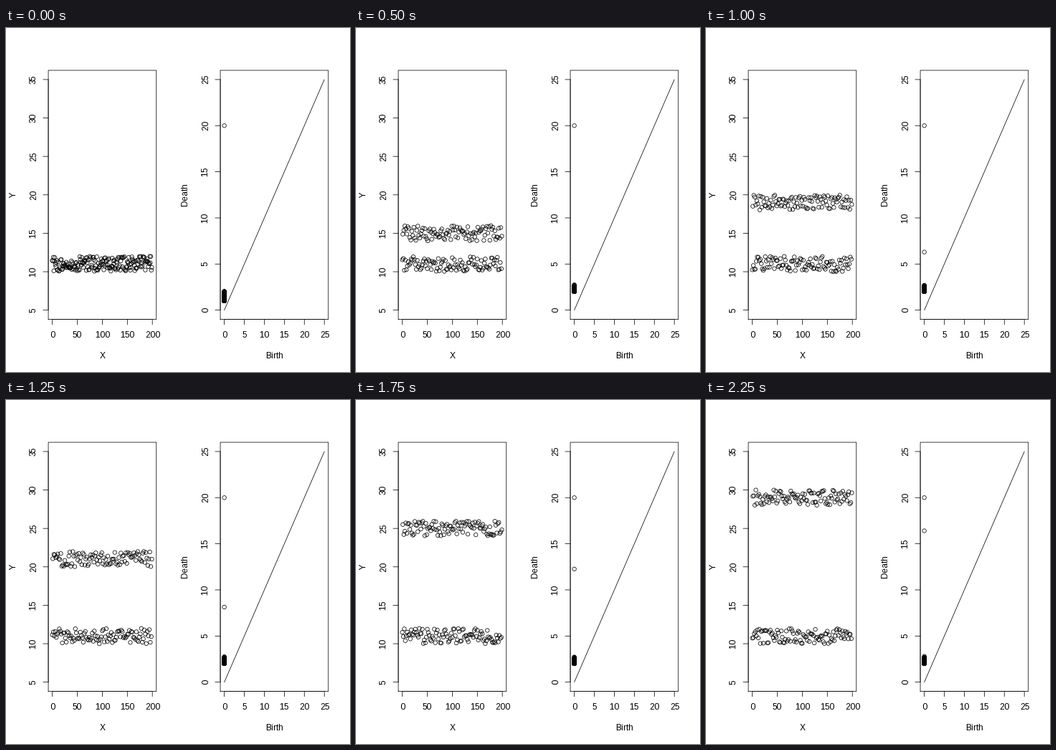
A matplotlib script that plays this animation: 480x480 px, repeating every 2500 ms.

```python
import numpy as np
import matplotlib.pyplot as plt
from matplotlib.animation import FuncAnimation
from matplotlib.collections import PatchCollection
from matplotlib.patches import Circle

SIZE, DPI = 480, 72
FRAMES, INTERVAL = 10, 250
LINE = 14.4                      # height of one margin line, in pixels
TOP, BOTTOM = 4.1 * LINE, SIZE - 5.1 * LINE
TICK = LINE / 2
STROKE = 0.75
RADIUS = 2.7
MAX_SCALE = 20

plt.rcParams["font.family"] = "Liberation Sans"
plt.rcParams["text.hinting_factor"] = 1    # whole-pixel glyph advances
fig = plt.figure(figsize=(SIZE / DPI, SIZE / DPI), dpi=DPI, facecolor="white")
ax = fig.add_axes([0, 0, 1, 1])
ax.set(xlim=(0, SIZE), ylim=(SIZE, 0))
ax.axis("off")


def stroke(xs, ys):
    ax.plot(xs, ys, color="black", lw=STROKE, snap=False,
            solid_capstyle="round", solid_joinstyle="round")


def label(x, y, text, rotation=0):
    ax.text(x, y, text, size=12, ha="center", va="baseline",
            rotation=rotation, rotation_mode="anchor")


def rescale(v, lo, hi, start, end):
    """Map lo..hi into start..end with a 4% pad on both sides."""
    return start + (end - start) * ((v - lo) / (hi - lo) + 0.04) / 1.08


class Panel:
    def __init__(self, offset, xticks, yticks, xlabel, ylabel):
        self.left = offset + 4.1 * LINE
        self.right = offset + SIZE / 2 - 2.1 * LINE
        self.xlim = xticks[0], xticks[-1]
        self.ylim = yticks[0], yticks[-1]
        self.draw_axes(xticks, yticks, xlabel, ylabel)

    def x(self, v):
        return rescale(v, *self.xlim, self.left, self.right)

    def y(self, v):
        return rescale(v, *self.ylim, BOTTOM, TOP)

    def draw_axes(self, xticks, yticks, xlabel, ylabel):
        left, right = self.left, self.right
        stroke([left, right, right, left, left],
               [BOTTOM, BOTTOM, TOP, TOP, BOTTOM])
        # The axis lines lie over the box and darken it between the end ticks.
        stroke([self.x(v) for v in self.xlim], [BOTTOM] * 2)
        stroke([left] * 2, [self.y(v) for v in self.ylim])
        for v in xticks:
            stroke([self.x(v)] * 2, [BOTTOM, BOTTOM + TICK])
            label(self.x(v), BOTTOM + 1.8 * LINE, str(v))
        for v in yticks:
            stroke([left, left - TICK], [self.y(v)] * 2)
            label(left - 1.2 * LINE, self.y(v), str(v), 90)
        label((left + right) / 2, BOTTOM + 3.8 * LINE, xlabel)
        label(left - 3.2 * LINE, (TOP + BOTTOM) / 2, ylabel, 90)

    def circles(self, xs, ys):
        return [Circle((self.x(x), self.y(y)), RADIUS) for x, y in zip(xs, ys)]


def merge_distances(points):
    """Edge lengths of the minimum spanning tree: deaths of the components."""
    dist = np.hypot(*(points[:, None] - points[None]).transpose(2, 0, 1))
    nearest = dist[0].copy()
    nearest[0] = np.inf
    visited = np.zeros(len(points), bool)
    visited[0] = True
    deaths = []
    for _ in range(len(points) - 1):
        i = int(np.argmin(nearest))
        deaths.append(nearest[i])
        visited[i] = True
        nearest = np.where(visited, np.inf, np.minimum(nearest, dist[i]))
    return deaths


def sample_bands(step):
    """Two interleaved noisy bands; the upper one rises by 2 each step."""
    rng = np.random.default_rng(40 + step)
    xs = np.arange(200)
    ys = rng.uniform(10, 12, 200) + 2 * step * (xs % 2)
    return np.column_stack([xs, ys])


scatter = Panel(0, range(0, 201, 50), range(5, 36, 5), "X", "Y")
diagram = Panel(SIZE / 2, range(0, 26, 5), range(0, 26, 5), "Birth", "Death")
stroke([diagram.x(0), diagram.x(25)], [diagram.y(0), diagram.y(25)])

dots = PatchCollection([], facecolor="none", edgecolor="black",
                       linewidth=STROKE)
ax.add_collection(dots, autolim=False)


def update(step):
    points = sample_bands(step)
    deaths = merge_distances(points) + [MAX_SCALE]
    dots.set_paths(scatter.circles(*points.T)
                   + diagram.circles([0] * len(deaths), deaths))
    return [dots]


anim = FuncAnimation(fig, update, frames=FRAMES, interval=INTERVAL,
                     init_func=lambda: update(0), repeat=True, repeat_delay=0)
plt.show()
```
